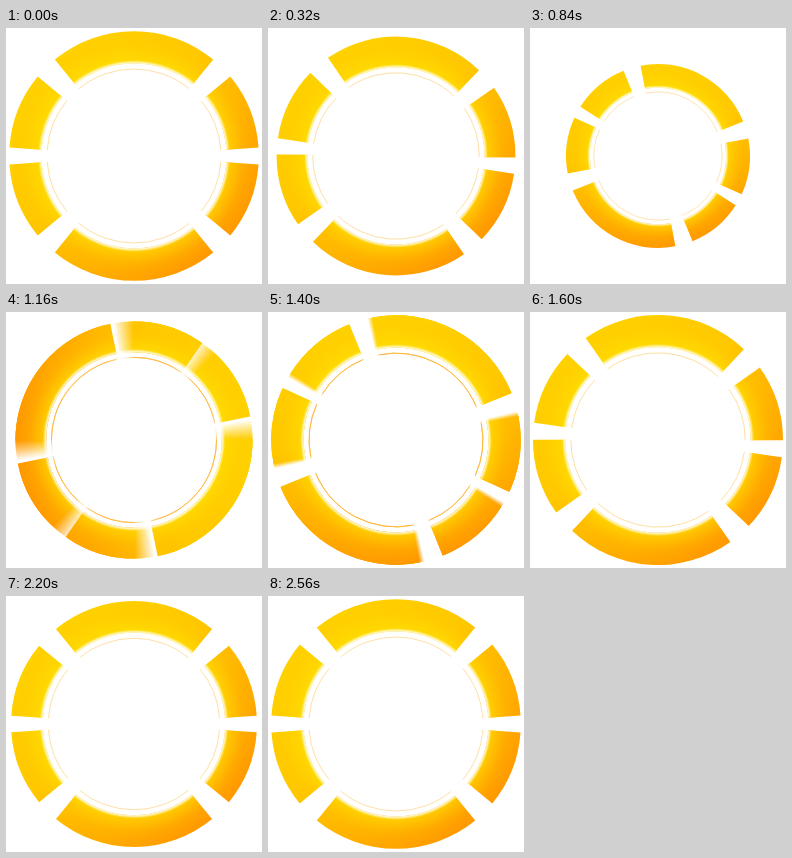
An HTML page that plays this animation: 256 by 256 pixels, repeating every 2880 ms.

```html
<!DOCTYPE html>
<html lang="en">
<head>
<meta charset="utf-8">
<title>Ring spinner</title>
<style>
html, body { margin: 0; width: 100%; height: 100%; overflow: hidden; background: #fff; }
svg { display: block; width: 100vw; height: 100vh; }
</style>
</head>
<body>
<svg id="stage" viewBox="0 0 256 256">
  <defs>
    <linearGradient id="body" gradientUnits="userSpaceOnUse" x1="-92" y1="-84" x2="84" y2="92">
      <stop offset="0" stop-color="#ffd200"/>
      <stop offset=".4" stop-color="#ffc800"/>
      <stop offset=".75" stop-color="#ffac00"/>
      <stop offset="1" stop-color="#ff9800"/>
    </linearGradient>
    <radialGradient id="glow" gradientUnits="userSpaceOnUse" cx="0" cy="0" r="125">
      <stop offset=".736" stop-color="#fff"/>
      <stop offset=".75" stop-color="#fff6b0" stop-opacity=".9"/>
      <stop offset=".768" stop-color="#ffe000" stop-opacity=".6"/>
      <stop offset=".88" stop-color="#ffd800" stop-opacity=".15"/>
      <stop offset="1" stop-color="#ffb000" stop-opacity="0"/>
    </radialGradient>
    <g id="ring">
      <path id="fill" fill="url(#body)"/>
      <path id="shine" fill="url(#glow)"/>
      <path id="rim" fill="none" stroke="#ffa500" stroke-width=".6" stroke-opacity=".6"/>
    </g>
  </defs>
  <g id="layers"></g>
</svg>
<script>
const LOOP = 2880, STEP = 40, SHUTTER = 13, LAYERS = 16;
const OUTER = 124.8, INNER = 92.5, RIM = 87;
const $ = id => document.getElementById(id);

// Angles are in degrees, clockwise from the top.
const segments = [[-39.4, 39.4], [50.5, 86.1], [93.9, 129.5],
                  [140.6, 219.4], [230.5, 266.1], [273.9, 309.5]];

function point(r, deg) {
  const a = deg * Math.PI / 180;
  return (r * Math.sin(a)).toFixed(2) + ' ' + (-r * Math.cos(a)).toFixed(2);
}

function wedge([a, b]) {
  return `M${point(OUTER, a)}A${OUTER} ${OUTER} 0 0 1 ${point(OUTER, b)}` +
         `L${point(INNER, b)}A${INNER} ${INNER} 0 0 0 ${point(INNER, a)}Z`;
}

function arc([a, b]) {
  return `M${point(RIM, a)}A${RIM} ${RIM} 0 0 1 ${point(RIM, b)}`;
}

const wedges = segments.map(wedge).join('');
$('fill').setAttribute('d', wedges);
$('shine').setAttribute('d', wedges);
$('rim').setAttribute('d', segments.map(arc).join(''));

function bezier(x1, x2) {
  return x => {
    let lo = 0, hi = 1;
    for (let i = 0; i < 30; i++) {
      const s = (lo + hi) / 2, q = 1 - s;
      if (3 * s * q * q * x1 + 3 * s * s * q * x2 + s * s * s < x) lo = s; else hi = s;
    }
    return lo * lo * (3 - 2 * lo);
  };
}

const windUp = bezier(.7, .45), spin = bezier(.414, 0), grow = bezier(.54, 0);

// Each key: [time, value, easing used to arrive there]
const turnKeys = [[0, 0], [840, 28.5, windUp], [1750, -360, spin]];
const sizeKeys = [[0, 124.8], [840, 92, windUp], [1540, 125.2, grow],
                  [1920, 116.8, windUp], [2560, 124.8, grow]];

function valueAt(keys, t) {
  for (let i = 1; i < keys.length; i++) {
    const [t0, v0] = keys[i - 1], [t1, v1, ease] = keys[i];
    if (t <= t1) return t <= t0 ? v0 : v0 + (v1 - v0) * ease((t - t0) / (t1 - t0));
  }
  return keys[keys.length - 1][1];
}

// Stacked copies with opacity 1/n average out to an even motion blur.
const layers = Array.from({ length: LAYERS }, (_, i) => {
  const use = document.createElementNS('http://www.w3.org/2000/svg', 'use');
  use.setAttribute('href', '#ring');
  use.setAttribute('opacity', 1 / (i + 1));
  $('layers').append(use);
  return use;
});

function draw(time) {
  const t = Math.floor((time % LOOP) / STEP) * STEP;
  const scale = valueAt(sizeKeys, t) / OUTER;
  const from = valueAt(turnKeys, t - SHUTTER / 2);
  const to = valueAt(turnKeys, t + SHUTTER / 2);
  const blurred = Math.abs(to - from) > .8;
  layers.forEach((use, i) => {
    const turn = blurred ? from + (to - from) * (i + .5) / LAYERS : valueAt(turnKeys, t);
    use.setAttribute('display', blurred || i === 0 ? 'inline' : 'none');
    use.setAttribute('transform', `translate(128 128) rotate(${turn}) scale(${scale})`);
  });
}

let start;
function tick(now) {
  if (start === undefined) start = now;
  draw(now - start);
  requestAnimationFrame(tick);
}
draw(0);
requestAnimationFrame(tick);
</script>
</body>
</html>
```
